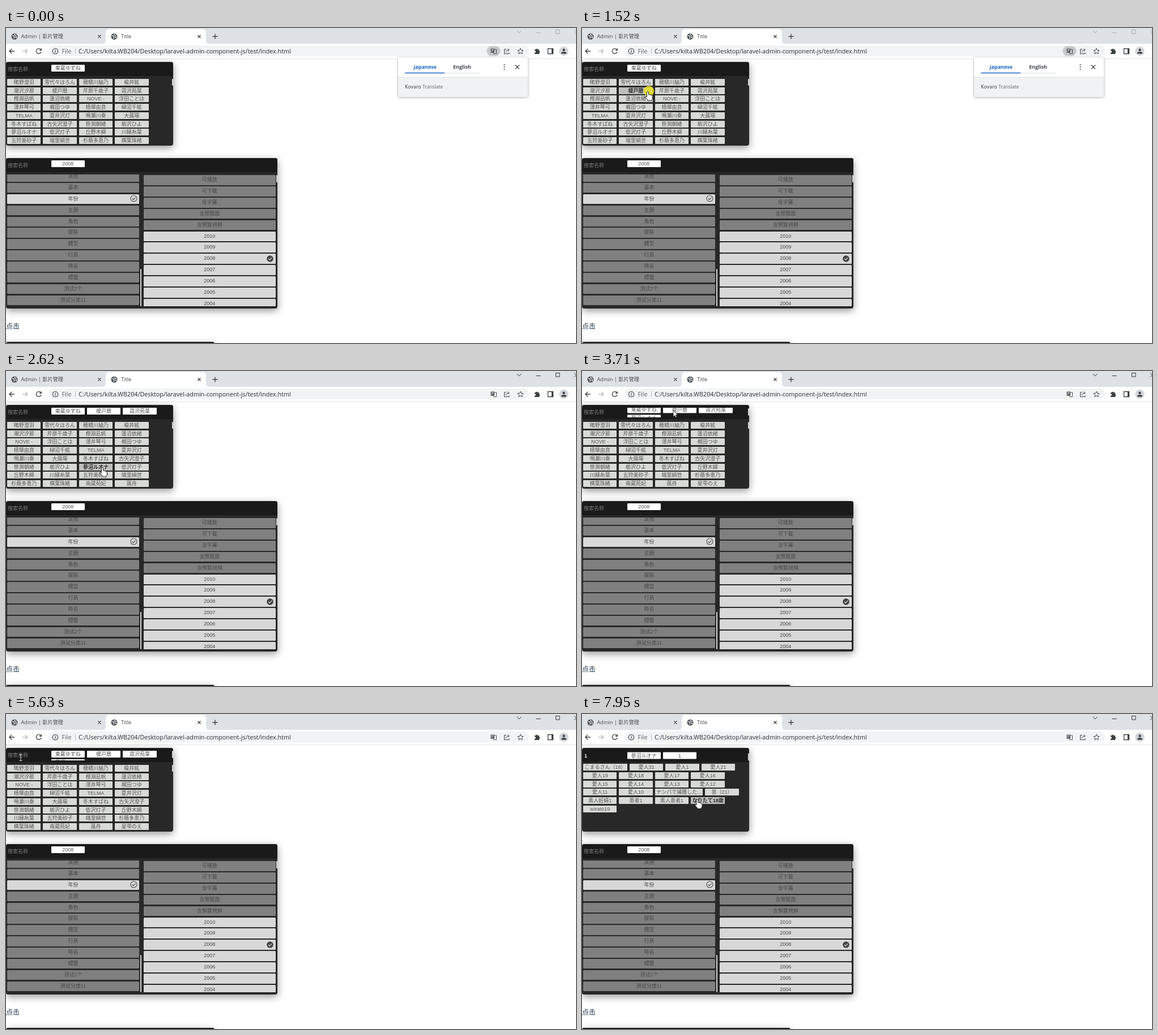
An HTML page for the animation above (8 s loop, 1006x557 px).

```html
<!DOCTYPE html>
<html>
<head>
<meta charset="utf-8">
<title>Title</title>
<style>
html, body { margin: 0; width: 100%; height: 100%; overflow: hidden; background: #fff; }
#stage { position: relative; width: 1006px; height: 557px; overflow: hidden; background: #fff;
  font: 9px/12px "Liberation Sans", "Noto Sans CJK JP", "Noto Sans CJK SC", sans-serif; }
#stage svg, .abs, .panel, .clip, .thumb, .flow, .hot { position: absolute; }
svg { overflow: visible; left: 0; top: 0; }
svg text { font-family: "Open Sans", "Noto Sans CJK SC", sans-serif; }
.line { fill: none; stroke: #3c4043; stroke-width: 1.3; }
.panel { left: 0; background: #282828; border-radius: 4px; box-shadow: 0 4px 14px rgba(0,0,0,.42); }
.panel::before { content: ""; display: block; height: 25px; background: #1a1a1a; border-radius: 4px 4px 0 0; }
.hint { left: 3px; top: 7px; color: #7d7d7d; font-family: "Noto Sans CJK SC", sans-serif; }
.clip { overflow: hidden; }
.flow { display: flex; flex-wrap: wrap; gap: 2.75px 4px; align-items: flex-start; }
.cell { position: relative; box-sizing: border-box; min-width: 59.4px; height: 12px; padding: 0 2.5px;
  border-radius: 1px; background: #d8dad7; color: #555; text-align: center; white-space: nowrap; }
.chips .cell { background: #fff; }
.hot { inset: 0; border-radius: 1px; background: #bfc0be; color: #2a2a2a; font-weight: 700; }
.column { display: flex; flex-direction: column; gap: 2.29px; }
.row { position: relative; height: 17.6px; line-height: 17.6px; border-radius: 1.5px; text-align: center;
  background: #808080; color: #484848; font-family: "Liberation Sans", "Noto Sans CJK SC", sans-serif; }
.row.on { background: #d8d8d8; }
.thumb { width: 2.4px; border-radius: 1px; background: #d4d4d4; }
#popup { left: 692px; top: 52px; width: 229px; height: 70px; background: #fff; border-radius: 2px;
  box-shadow: 0 0 0 .6px #c9cbce, 0 1px 4px rgba(0,0,0,.3); }
#caret { width: 1px; height: 11px; left: 4px; top: 8px; background: #fff; }
#cursor { left: 0; top: 0; width: 0; height: 0; }
</style>
</head>
<body>
<div id="stage">
  <svg width="1006" height="56">
    <rect width="1006" height="28" fill="#dee1e6"/>
    <path d="M170 28q6 0 6-6V8q0-6 6-6H347q6 0 6 6V22q0 6 6 6z" fill="#fff"/>
    <path d="M0 54.5H1006" stroke="#e1e3e6"/>
    <rect x="75" y="31" width="848" height="19" rx="9.5" fill="#f1f3f4"/>
    <g id="globe">
      <circle cx="15" cy="15" r="5.5" fill="#4d5156"/>
      <path d="M11 13.5l3 .5 1 2-1.500 3M15 10.500l.5 2 3 .5M16.500 15.500l2 .5-1 2" fill="none" stroke="#e8eaed" stroke-width="1.3"/>
    </g>
    <use href="#globe" x="176"/>
    <g font-size="9.200">
      <text x="26.500" y="18.400" fill="#45494d">Admin | 影片管理</text>
      <text x="203" y="18.400" fill="#3c4043">Title</text>
    </g>
    <g class="line">
      <path d="M162.500 12.500l5 5m0-5l-5 5M338.500 12.500l5 5m0-5l-5 5M364.500 15h9m-4.500-4.500v9"/>
      <path d="M15 41H6m4.300-4.300L6 41l4.300 4.300"/>
      <path d="M29 41h9m-4.300-4.300L38 41l-4.300 4.300" stroke="#b9bcc0"/>
      <path d="M61.400 38.300A4.400 4.400 0 1 0 62 42M62.300 36v3.300h-3.300"/>
      <circle cx="87" cy="41" r="4.800" stroke-width="1.100"/>
      <path d="M87 40.300v3.200M87 38.200v1.200"/>
      <path d="M122.500 36v10" stroke="#bdc1c6" stroke-width="1"/>
    </g>
    <g id="windowButtons" fill="none" stroke-width="1">
      <path d="M902 5l3.700 4 3.700-4M935.500 8.500h8M970.500 3.500h6.500v6.500h-6.500zM1003 3.500l7 7m0-7l-7 7"/>
    </g>
    <g font-size="10.750">
      <text x="98.500" y="44.800" fill="#5f6368">File</text>
      <text x="128" y="44.800" fill="#2a2d31">C:/Users/kilta.WB204/Desktop/laravel-admin-component-js/test/index.html</text>
    </g>
    <rect id="badge" x="848.500" y="32" width="24" height="17.500" rx="8.700" fill="#c6c8cb"/>
    <g class="line" stroke-width="1">
      <rect x="855.500" y="36.500" width="6.500" height="7.500" fill="#5f6368" stroke="none"/>
      <path d="M862 38h3.500v7.500h-5.500M857 38.500h3.500m-1.700 0q0 2.500-1.800 4m.3-3q1 2 2.700 2.500" stroke-width=".9"/>
      <path d="M857 38.500h3.500m-1.700 0q0 2.500-1.800 4" stroke="#fff" stroke-width=".8"/>
      <path d="M883 37.500h-3.500v8h8.500v-2.500M882 43q.5-4 6-4.200m-2.500-2.500l2.700 2.500-2.700 2.500" stroke-width="1"/>
      <path d="M908 36l1.500 3.300 3.600.4-2.700 2.400.8 3.500-3.200-1.800-3.200 1.800.8-3.500-2.700-2.400 3.600-.4z" stroke-width="1"/>
      <path d="M933 38h2.300a1.500 1.500 0 1 1 3 0H941v3a1.500 1.500 0 1 1 0 3v2h-8v-2.700a1.500 1.500 0 1 0 0-2.800z" fill="#3c4043" stroke="none"/>
      <path d="M956.500 36.500h9v9h-9zM963.500 36.500v9M964.500 36.500v9"/>
    </g>
    <circle cx="984.500" cy="41" r="8.300" fill="#d3d6da"/>
    <circle cx="984.500" cy="38.800" r="2.200" fill="#3c4043"/>
    <path d="M980 45.500v-1q0-2.500 4.500-2.500t4.500 2.500v1z" fill="#3c4043"/>
  </svg>

  <div class="panel" style="top:60px;width:295px;height:148px">
    <div class="abs hint" id="hint">搜索名称</div>
    <b class="abs" id="query" style="left:4px;top:7.500px;color:#fff">1</b>
    <div class="abs" id="caret"></div>
    <div class="clip" id="chips" style="left:79.500px;top:5px;width:212px;height:17px"></div>
    <div class="clip" id="list" style="left:2px;top:27px;width:290px;height:119px"></div>
    <div class="thumb" id="chipThumb" style="left:292.500px;top:5px;height:12.700px"></div>
    <div class="thumb" id="listThumb" style="left:292.500px;top:30px;height:12px"></div>
  </div>

  <div class="panel" style="top:230px;width:479px;height:265.500px">
    <div class="abs hint">搜索名称</div>
    <div class="abs chips" style="left:79.500px;top:4px"><div class="cell">2008</div></div>
    <div class="clip" style="left:2px;top:29px;width:233px;height:233px">
      <div class="column" id="groups" style="margin-top:-5px"></div>
    </div>
    <div class="clip" style="left:243px;top:29px;width:232.500px;height:233px">
      <div class="column" id="tags" style="margin-top:1.200px"></div>
    </div>
    <div class="thumb" style="left:236.800px;top:196px;height:66px"></div>
    <div class="thumb" style="left:476.600px;top:30px;height:13px"></div>
    <svg width="479" height="266" fill="none" stroke-width="1.100">
      <circle cx="225.500" cy="71.500" r="5.500" stroke="#4a4a4a"/>
      <path d="M222.800 71.500l2.100 2.200 3.600-4" stroke="#4a4a4a"/>
      <circle cx="466" cy="178" r="5.800" fill="#444"/>
      <path d="M463.300 178l2.100 2.200 3.600-4" stroke="#e4e4e4"/>
    </svg>
  </div>

  <div class="abs" style="left:0;top:518px;font:12px/17px 'Noto Sans CJK SC',sans-serif;color:#213547">点击</div>
  <div class="panel" style="top:555px;width:368px;height:40px"></div>

  <div class="abs" id="popup">
    <svg width="229" height="70">
      <path d="M0 35H229V68q0 2-2 2H2q-2 0-2-2z" fill="#f1f2f3"/>
      <path d="M0 35H229M82 28H144" stroke="#dcdee1"/>
      <path d="M12 27.500H82" stroke="#1a66c9" stroke-width="1.600"/>
      <g font-size="9" font-weight="700">
        <text x="27.300" y="20.300" fill="#1a66c9">Japanese</text>
        <text x="97" y="20.300" fill="#45494d">English</text>
      </g>
      <text x="12" y="55" font-size="8.500" fill="#5f6368"><tspan font-weight="600">Kovaro</tspan> Translate</text>
      <g fill="#3c4043"><circle cx="187.500" cy="13" r="1.100"/><circle cx="187.500" cy="17" r="1.100"/><circle cx="187.500" cy="21" r="1.100"/></g>
      <path class="line" d="M207 13.500l7 7m0-7l-7 7"/>
    </svg>
  </div>

  <div class="abs" id="cursor">
    <svg width="1" height="1">
      <circle id="press" cx="2" cy="-.5" r="9.300" fill="#e6e01e" fill-opacity=".82"/>
      <path id="hand" d="M-1.500 1.200Q0-1 1.500 1.200V6Q3 5 4 6.300 5.500 5.500 6.300 7 8.300 6.500 8.500 8.500V12Q8 14 7 15V16.500H0V15Q-2 13-4 10.300-4.500 8.300-2.800 8.800L-1.500 10z" fill="#fff" stroke="#111" stroke-width=".9"/>
      <path id="arrow" d="M0 0V11.500L2.700 9 4.500 13 6.300 12.200 4.600 8.300H8.200z" fill="#fff" stroke="#111" stroke-width=".8"/>
      <path id="beam" d="M-2.500-5.500H2.500M0-5.500V5.500M-2.500 5.500H2.500" fill="none" stroke="#ddd"/>
    </svg>
  </div>
</div>

<script>
const LOOP = 8000;
const $ = id => document.getElementById(id);
const sheet = document.head.appendChild(document.createElement('style'));
let rules = '', count = 0;

// frames: [time in ms, declarations]
function animate(el, frames, timing = 'linear') {
  const name = 'k' + count++;
  const steps = frames.map(([t, css]) => `${(t / LOOP * 100).toFixed(4)}%{${css}}`);
  rules += `@keyframes ${name}{${steps.join('')}}\n`;
  el.style.animation = `${name} ${LOOP}ms ${timing} infinite`;
}

// Visible only inside the given [from, to] spans.
function show(el, ...spans) {
  const frames = [[0, 'opacity:0']];
  for (const [from, to] of spans) frames.push([from, 'opacity:1'], [to, 'opacity:0']);
  if (spans[spans.length - 1][1] < LOOP) frames.push([LOOP, 'opacity:0']);
  animate(el, frames, 'step-end');
}

function add(parent, cls, text = '') {
  const el = parent.appendChild(document.createElement('div'));
  el.className = cls;
  el.textContent = text;
  return el;
}

// One state of a wrapped list; hovers: [index, from, to]
function scene(parent, cls, names, span, top = 0, hovers = []) {
  const flow = add(parent, 'flow ' + cls);
  flow.style.top = top + 'px';
  flow.style.width = parent.style.width;
  const cells = names.map(name => add(flow, 'cell', name));
  for (const [i, from, to] of hovers) show(add(cells[i], 'hot', names[i]), [from, to]);
  show(flow, span);
}

const people = `鴫野澄羽,雪代々ほろん,穂積川紬乃,楡井絃,潮沢汐那,榎戸暦,芹原千歳子,霞沢苑葉,樫淵凪帆,蓮沼依緒,NOVE -,浮田ことほ,
薄井琴弓,梶田つゆ,槙塚由良,榊沼千絃,TELMA,夏井沢灯,鳴瀬川奏,大蕗環,冬木すばね,古矢沢澄子,笹渕朝緒,栃沢ひよ,
蓼沼ルオナ,低沢灯子,丘野木綿,川縁糸葉,五狩美砂子,端里絹世,杉蔭多恵乃,横葉珠緒,南蔵苑妃,蕗舟,星雫のえ`.split(/,\s*/);
const found = ('こまるさん（18）,' + [31, 1, 21, 19, 18, 17, 16, 15, 14, 13, 12, 11, 10].map(n => '愛人' + n) +
  ',ナンパで捕獲した...,苗（21）,素人妊婦1,患者1,素人患者1,1,なりたて18歳,sorato19').split(',');
const picked = ['東蔵ゆずね', people[5], people[7], people[24], '1'];
const without = (names, n) => names.filter(x => !picked.slice(1, n).includes(x));

const list = $('list');
scene(list, '', people, [0, 1600], 2.8, [[5, 1400, 1600]]);
scene(list, '', without(people, 2), [1600, 2200], 2.8, [[5, 1600, 1850], [6, 1950, 2200]]);
scene(list, '', without(people, 3), [2200, 2830], 2.8, [[6, 2200, 2330], [22, 2540, 2830]]);
scene(list, '', without(people, 4), [2830, 6160], 2.8, [[22, 2830, 2960], [0, 4680, 4850]]);
scene(list, '', found, [6160, 7740], 1.2, [[18, 6850, 7200], [19, 7390, 7740]]);
scene(list, '', without(found, 5), [7740, LOOP], 1.2, [[19, 7740, LOOP]]);
show($('listThumb'), [0, 6160]);

const chips = $('chips');
[0, 1600, 2200, 2830, 7740].forEach((from, i, starts) => {
  const holder = add(chips, 'abs');
  holder.style.width = '206px';
  scene(holder, 'chips', picked.slice(0, i + 1), [from, starts[i + 1] || LOOP]);
  if (i > 2) animate(holder, scrollFrames(1));
});
const thumb = $('chipThumb');
animate(thumb, scrollFrames(-.35).map(([t, css]) => [t, css + `;opacity:${t < 2830 ? 0 : 1}`]));

function scrollFrames(k) {
  return [[0, 0], [2829, 0], [2830, 0], [3640, 0], [3710, 2.6], [3900, 12.5], [4060, 12.5], [4200, 7], [4330, 7],
    [4480, 0], [7740, 0], [7940, 12.5], [LOOP, 12.5]]
    .map(([t, y]) => [t, `transform:translateY(${(-y * k).toFixed(2)}px)`]);
}

const fill = (id, names, lit) => names.forEach((name, i) => add($(id), lit(i) ? 'row on' : 'row', name));
fill('groups', '其他,基本,年份,主題,角色,服裝,體型,行爲,時長,標籤,测试2个,测试分类11'.split(','), i => i === 2);
fill('tags', '可播放,可下載,含字幕,含預覽圖,含預覽視頻,2010,2009,2008,2007,2006,2005,2004'.split(','), i => i > 4);

// Search field
show($('hint'), [0, 6160]);
show($('query'), [6160, LOOP]);
animate($('caret'), [[0, 'opacity:0'], [5160, 'opacity:1'], [5630, 'opacity:0'], [6160, 'opacity:1;left:8px'],
  [6690, 'opacity:0;left:8px'], [7220, 'opacity:1;left:8px'], [7740, 'opacity:0;left:8px'], [LOOP, 'opacity:0']], 'step-end');

// Window gains focus, translate bubble closes
animate($('windowButtons'), [[0, 'stroke:#a6a9ad'], [1600, 'stroke:#303236'], [LOOP, 'stroke:#303236']], 'step-end');
animate($('popup'), [[0, 'opacity:1'], [1600, 'opacity:1'], [1810, 'opacity:0'], [LOOP, 'opacity:0']]);
animate($('badge'), [[0, 'opacity:1'], [1810, 'opacity:1'], [1950, 'opacity:0'], [LOOP, 'opacity:0']]);

// Pointer
const path = [[0, 905, 552], [200, 905, 548], [480, 430, 310], [760, 95, 130], [970, 72, 76], [1040, 72, 76],
  [1400, 116, 112], [1740, 116, 112], [2000, 158, 111], [2230, 158, 111], [2560, 170, 170.5], [2830, 170, 170.5],
  [3310, 161, 69.5], [4330, 161, 69.5], [4560, 110, 95], [4770, 42, 97], [4960, 26, 77], [6560, 26, 77],
  [6760, 143, 154], [7100, 176, 157], [7390, 203.5, 151], [LOOP, 203.5, 151]];
animate($('cursor'), path.map(([t, x, y]) => [t, `transform:translate(${x}px,${y}px)`]));
show($('arrow'), [200, 690], [900, 1130], [3190, 4480]);
show($('hand'), [690, 900], [1130, 3190], [4480, 4880], [6620, LOOP]);
show($('beam'), [4880, 6160], [6560, 6620]);
show($('press'), [1480, 1600], [2110, 2200], [2750, 2830], [5160, 5230], [7460, 7590]);

sheet.textContent = rules;
</script>
</body>
</html>
```
